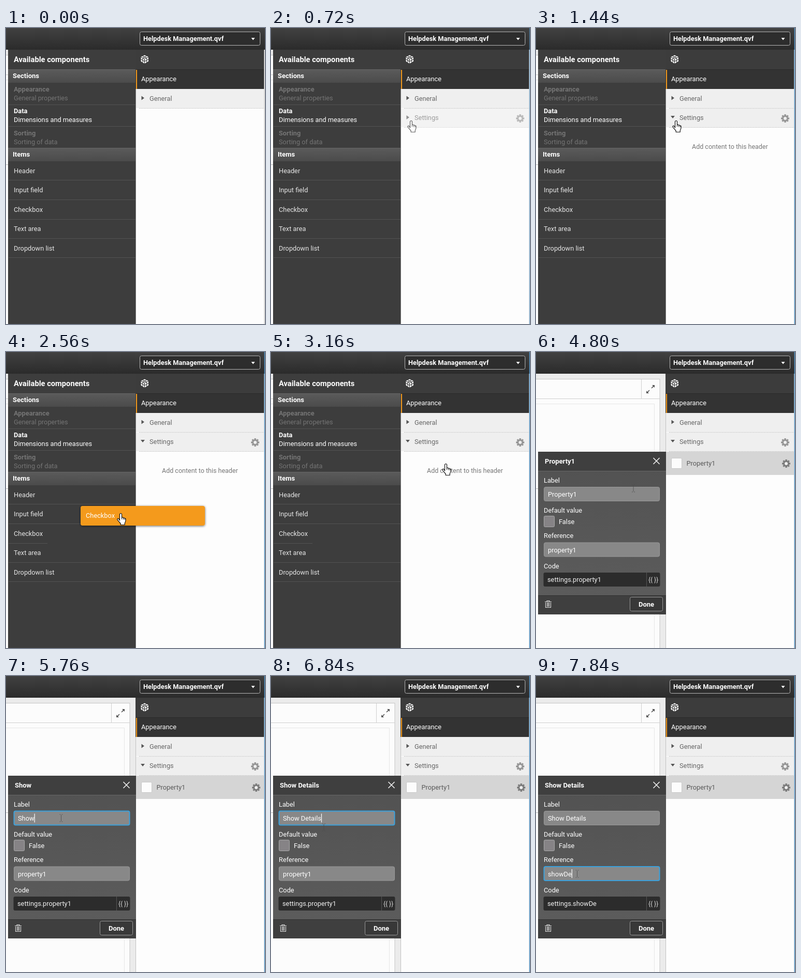
An HTML page that plays this animation: 500 px wide and 573 px high, repeating every 8 s.

```html
<!DOCTYPE html>
<html lang="en">
<head>
<meta charset="utf-8">
<title>Adding a checkbox property</title>
<style>
  html, body { margin: 0; width: 100%; height: 100%; overflow: hidden; background: #fff; }
  svg { display: block; width: 100%; height: 100%; }
  text { font: 12.8px Roboto, sans-serif; white-space: pre; }
  .b { font-weight: 700; font-size: 13px; }
</style>
</head>
<body>
<svg id="stage" viewBox="0 0 500 573"></svg>
<script>
const LOOP = 8000;

// Markup helpers
const rect = (x, y, w, h, fill, extra = '') =>
  `<rect x="${x}" y="${y}" width="${w}" height="${h}" fill="${fill}" ${extra}/>`;
const text = (x, mid, s, fill, extra = '') =>
  `<text x="${x}" y="${mid + 4.5}" fill="${fill}" ${extra}>${s}</text>`;
const bold = (x, mid, s, fill, extra = '') => text(x, mid, s, fill, `class="b" ${extra}`);
const path = (d, fill, extra = '') => `<path d="${d}" fill="${fill}" ${extra}/>`;
const line = (d, stroke, extra = '') => path(d, 'none', `stroke="${stroke}" ${extra}`);
const group = (id, body, extra = '') => `<g id="${id}" ${extra}>${body}</g>`;
const gradient = (id, from, to) =>
  `<linearGradient id="${id}" x2="0" y2="1"><stop stop-color="${from}"/><stop offset="1" stop-color="${to}"/></linearGradient>`;
const dashed = y => line(`M257 ${y}H498`, '#c6c6c6', 'stroke-dasharray="2 1"');

const gear = (id, x, y, fill) => {
  const teeth = [0, 45, 90, 135].map(a => rect(-1.7, -8, 3.4, 16, 'currentColor', `transform="rotate(${a})"`)).join('');
  return `<g id="${id}" transform="translate(${x} ${y})" color="${fill}">${teeth}` +
    `<circle r="4.6" fill="none" stroke="currentColor" stroke-width="3"/><circle r="3" fill="#eee"/></g>`;
};

const defs = `<defs>
  ${gradient('bar', '#414141', '#2b2b2b')}
  ${gradient('section', '#5b5b5b', '#4b4b4b')}
  ${gradient('body', '#515151', '#5d5d5d')}
  <filter id="shadow" x="-10%" y="-30%" width="120%" height="170%">
    <feDropShadow dx="0" dy="1" stdDeviation="2" flood-opacity=".6"/>
  </filter></defs>`;

const sheet =
  rect(0, 42, 251, 531, '#ebebeb') +
  rect(-2, 52.5, 241, 530, '#fcfcfc', 'stroke="#c4c4c4"') +
  line('M0 90.5H239M203.5 53V90', '#cfcfcf') +
  line('M0 100.5H228.5V573', '#e6e6e6') +
  line('M0 264.5H209', '#bdbdbd') +
  line('M223 70L227.5 65.5M219 74L214.5 78.5', '#555', 'stroke-width="1.6"') +
  path('M224 64H229V69ZM213 75V80H218Z', '#555');

const topBar =
  rect(0, 0, 500, 42, 'url(#bar)') +
  rect(258.5, 7.5, 232, 26, '#2d2d2d', 'rx="3" stroke="#b5b5b5"') +
  bold(265, 20.5, 'Helpdesk Management.qvf', '#fff', 'style="font-size:12.8px"') +
  path('M473.5 19H480.5L477 23.5Z', '#fff');

const cube =
  path('M267.5 52.5L275 56V64.5L267.5 69L260.5 64.5V56Z', '#fff') +
  line('M260.5 56.5L267.5 60L275 56.5M267.5 60V69M264 54.5L271.5 58.2M271 54.5L264 58.2M264 58.5V66.5M271.5 58.5V66.5M260.5 60.5L267.5 64.5L275 60.5', '#3b3b3b', 'stroke-width="1.1"');

const properties =
  rect(250, 42, 249, 531, '#fdfdfd') +
  rect(250, 42, 248, 39, '#3c3c3c') + cube +
  rect(250, 80, 248, 38, '#333') + rect(250, 80, 248, 1, '#292929') +
  rect(251, 81, 2, 37, '#f39a1d') +
  text(261, 98.5, 'Appearance', '#fff') +
  rect(251, 118, 247, 37, '#efefef') + dashed(155.5) +
  path('M261.5 131.5V139.5L267 135.5Z', '#555') +
  text(277, 136, 'General', '#666') +
  line('M250.5 118V573', '#c2c2c2') + rect(498, 42, 2, 531, '#d5d5d5') +
  group('settings',
    rect(251, 156, 247, 36, '#efefef') + dashed(192.5) +
    path('M261.5 169V177L267 173Z', '#555', 'id="closed"') +
    path('M260 170H268L264 175Z', '#555', 'id="open"') +
    text(277, 173.5, 'Settings', '#666') + gear('gearTop', 481, 175, '#969696') +
    rect(498.7, 0, 1.3, 573, '#5599cd')) +
  group('hint', text(301, 229, 'Add content to this header', '#777', 'style="font-size:12.5px"')) +
  group('property',
    rect(251, 193, 247, 45, '#d5d5d5') +
    rect(261.5, 205.5, 20, 20, '#fcfcfc', 'rx="2" stroke="#c8c8c8"') +
    text(290.5, 215, 'Property1', '#595959') + gear('gearRow', 483, 216, '#7c7c7c'));

const sectionBar = (y, s) =>
  rect(4, y, 246, 26, 'url(#section)') + line(`M4 ${y + .5}H250`, '#666') + bold(13, y + 12.5, s, '#fff');
const sectionRow = (mid, title, note, fill) =>
  bold(15, mid, title, fill, 'style="font-size:12.8px"') + text(15, mid + 17, note, fill);
const itemLine = y => line(`M5 ${y}H250`, '#535353');

const components =
  rect(4, 42, 246.5, 531, '#3d3d3d') +
  bold(15, 61, 'Available components', '#fff', 'style="font-size:14.7px"') +
  sectionBar(80, 'Sections') +
  sectionRow(118, 'Appearance', 'General properties', '#757575') +
  sectionRow(160.5, 'Data', 'Dimensions and measures', '#fff') +
  sectionRow(203, 'Sorting', 'Sorting of data', '#757575') +
  itemLine(148.5) + itemLine(190.5) + sectionBar(232, 'Items') +
  ['Header', 'Input field', 'Checkbox', 'Text area', 'Dropdown list'].map((s, i) =>
    text(15, 276 + i * 37.6, s, '#e6e6e6') + (i === 2 ? '' : itemLine(Math.round(294 + i * 37.6) + .5))).join('') +
  line('M5 370.5H80', '#535353') + line('M80 370.5H250', '#535353', 'id="lineRest"');

const field = (id, y) =>
  rect(15.5, y, 223, 27, '#888', `id="${id}Box" rx="3"`) +
  rect(23, y + 5, 0, 17, '#3d8fce', `id="${id}Mark"`) +
  text(23, y + 14, '', '#fff', `id="${id}"`) +
  rect(0, y + 5, 1.2, 17, '#fff', `id="${id}Caret"`);

const dialog =
  rect(4, 193, 247, 315, 'url(#body)') +
  rect(4, 193, 247, 37, '#3f3f3f') + line('M4 230.5H251', '#686868') +
  bold(17, 211, '', '#fff', 'id="title"') +
  line('M226.5 205L238.5 217M238.5 205L226.5 217', '#eee', 'stroke-width="1.7"') +
  text(15, 248.5, 'Label', '#fff') + field('label', 261.5) +
  text(15, 306, 'Default value', '#fff') +
  rect(15.5, 317.5, 20, 21, '#868386', 'rx="2" stroke="#a9a9a9"') +
  text(44, 328, 'False', '#fff') +
  text(15, 355.5, 'Reference', '#fff') + field('ref', 369) +
  text(15, 414.5, 'Code', '#fff') +
  rect(14.5, 427, 225, 27, '#2c2c2c', 'rx="3"') + line('M213.5 427V454', '#555') +
  text(22, 440.5, '', '#f2f2f2', 'id="code"') + text(217, 440, '{{ }}', '#d8d8d8', 'style="font-size:12px"') +
  rect(4, 471, 247, 37, '#3f3f3f') + line('M4 471.5H251', '#303030') +
  line('M17 483.5H30M21 483V481.5H26V483M18.5 485V494.5H28.5V485M21.5 485V493M23.5 485V493M25.5 485V493', '#e2e2e2', 'stroke-width="1.1"') +
  rect(181.5, 474.5, 63, 27, '#383838', 'rx="3" stroke="#999"') +
  bold(198, 488, 'Done', '#fff');

const chip =
  rect(0, 0, 240, 38, '#f49a1b', 'rx="4" filter="url(#shadow)"') + text(10, 18.5, 'Checkbox', '#fff');

const hand =
  path('M5.5 14V2.5a2 2 0 0 1 4 0V8.5c1.5-1 3 0 3 .8 1.5-.7 2.6.2 2.7 1 1.3-.4 2 .5 2 1.7 0 4-.8 5.5-2 7.5V22.5H7.2V20C5.5 18 3 15 1.2 12.8 0 11 2.5 9.5 3.8 11.2z',
    '#fff', 'stroke="#111" stroke-width="1.2" stroke-linejoin="round"') +
  line('M9.5 8V12M12.5 9V12.5M15.2 10.5V13', '#111');
const beam = line('M4.5 -1H6.5M8.5 -1H10.5M7.5 0V12M4.5 13H6.5M8.5 13H10.5', '#4b4b4b');

document.getElementById('stage').innerHTML = defs + sheet + topBar + properties +
  group('components', components) + group('dialog', dialog) +
  group('chip', chip) + group('hand', hand) + group('beam', beam);

const el = id => document.getElementById(id);
const clamp = v => Math.max(0, Math.min(1, v));
const ramp = (t, a, b) => clamp((t - a) / (b - a));
const fade = (id, v) => el(id).setAttribute('opacity', v);
const show = (id, on) => fade(id, on ? 1 : 0);
const move = (id, x, y) => el(id).setAttribute('transform', `translate(${x} ${y})`);
const typed = (t, start, step, before, after) =>
  t < start ? before : after.slice(0, 1 + Math.floor((t - start) / step));

// Pointer route: time, x, y
const route = [
  [0, 263, 179], [1600, 263, 179], [1840, 75, 347], [2120, 75, 347],
  [2560, 214, 312], [2920, 325, 212], [3000, 330, 216], [3480, 330, 216],
  [4040, 474, 218], [4440, 474, 218], [4900, 99, 269], [6800, 99, 269], [7040, 72, 377], [LOOP, 72, 377]
];
function pointer(t) {
  const i = Math.max(1, route.findIndex(p => p[0] > t));
  const [t0, x0, y0] = route[i - 1], [t1, x1, y1] = route[i];
  const k = ramp(t, t0, t1);
  return [x0 + (x1 - x0) * k, y0 + (y1 - y0) * k];
}

function setField(id, value, focused, selected) {
  const node = el(id), box = el(id + 'Box');
  node.textContent = value;
  const width = node.getComputedTextLength();
  box.setAttribute('stroke', focused ? '#3ba1dc' : '#999');
  box.setAttribute('stroke-width', focused ? 2 : 1);
  el(id + 'Mark').setAttribute('width', selected ? width : 0);
  el(id + 'Caret').setAttribute('x', 23 + width);
  show(id + 'Caret', focused && !selected);
}

function draw(t) {
  const arrival = ramp(t, 200, 1000), expanded = t >= 1120, added = t >= 3200;
  fade('settings', arrival);
  show('closed', !expanded);
  show('open', expanded);
  fade('hint', added ? 0 : ramp(t, 1120, 1400));
  show('property', added);
  el('gearRow').setAttribute('color', t >= 4000 && t < 4560 ? '#444' : '#7c7c7c');

  fade('components', 1 - ramp(t, 3480, 3720));
  show('lineRest', t < 2160);
  fade('dialog', ramp(t, 4360, 4560));

  const [x, y] = pointer(t);
  move('hand', x, y);
  move('beam', x, y);
  move('chip', x - 70, y - 14);
  const writing = t > 4500 && x < 225;
  fade('hand', writing ? 0 : arrival);
  fade('beam', writing ? .8 : 0);
  show('chip', t >= 2120 && t < 2960);

  const label = typed(t, 5300, 120, 'Property1', 'Show Details');
  const ref = typed(t, 7260, 110, 'property1', 'showDe');
  setField('label', label, t >= 4940 && t < 7000, t >= 5000 && t < 5300);
  setField('ref', ref, t >= 7000, t >= 7040 && t < 7260);
  el('title').textContent = label;
  el('code').textContent = 'settings.' + ref;
}

const begin = performance.now();
function tick() {
  const t = (performance.now() - begin) % LOOP;
  draw(Math.floor(t / 40) * 40);
  requestAnimationFrame(tick);
}
tick();
</script>
</body>
</html>
```
